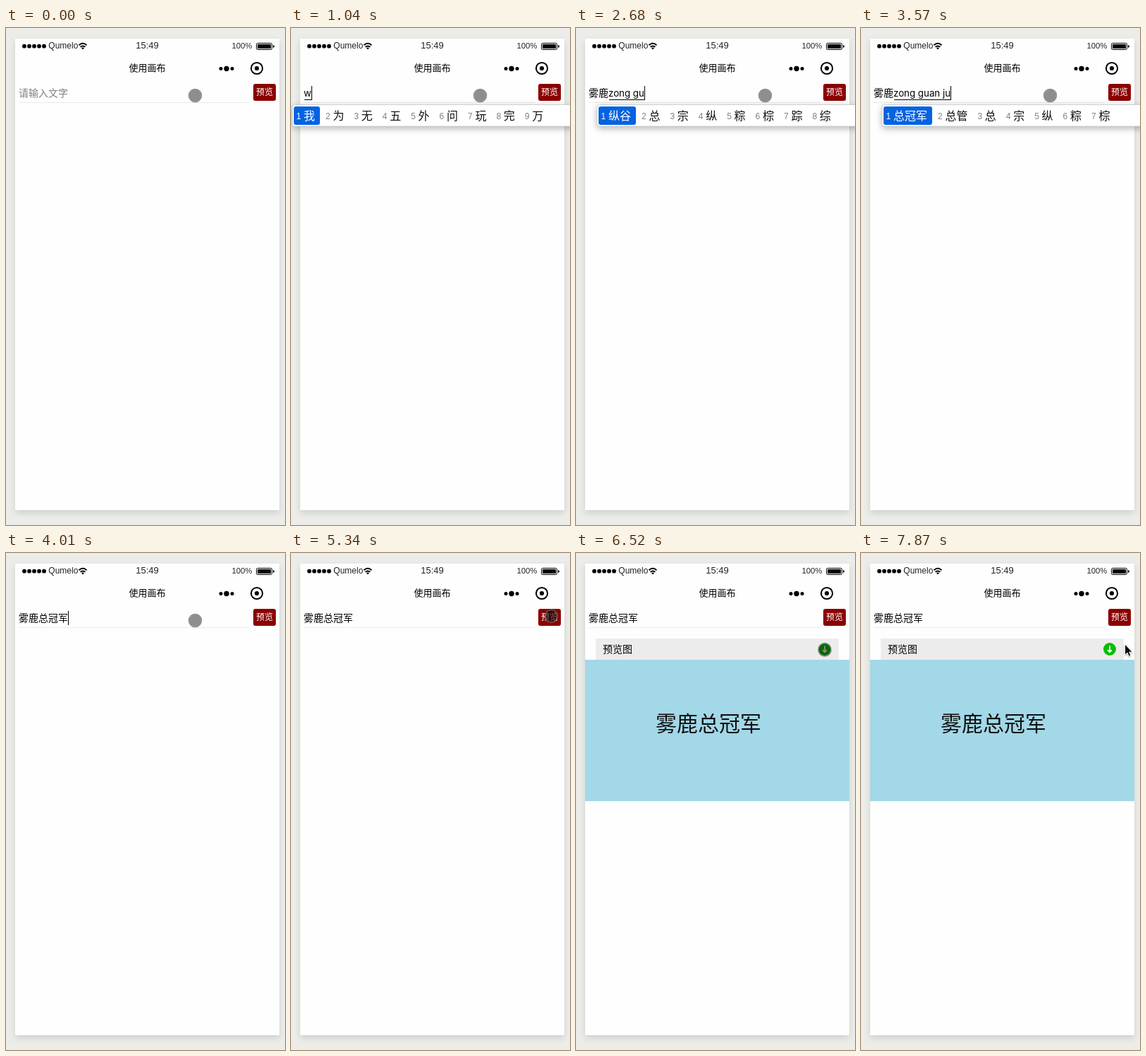
These frames come from a looping animation (396x703 px, 8 s). An HTML page:

```html
<!DOCTYPE html>
<html lang="zh-CN">
<head>
<meta charset="utf-8">
<title>使用画布</title>
<style>
  html, body { margin: 0; width: 100%; height: 100%; overflow: hidden; background: #ecede8; }
  svg { display: block; width: 396px; height: 703px; }
  text { font-family: "Noto Sans CJK SC", "Noto Sans CJK", "Noto Sans", sans-serif; white-space: pre; }
  .latin { font-family: "Liberation Sans", sans-serif; }
  .compose { font: 13.3px Inter, sans-serif; }
  .mid { text-anchor: middle; }
  .panel { filter: drop-shadow(0 3px 5px rgba(0, 0, 0, .28)); }
  .phone { filter: drop-shadow(0 4px 5px rgba(0, 0, 0, .12)); }
  .arrow { filter: drop-shadow(0 1px 1px rgba(0, 0, 0, .35)); }
</style>
</head>
<body>
<svg viewBox="0 0 396 703">
  <rect width="396" height="703" fill="#ecede8"/>
  <rect class="phone" x="13" y="15" width="375" height="667" fill="#fefefe"/>

  <g id="dots"></g>
  <text class="latin" x="60.3" y="29.3" font-size="12" fill="#222">Qumelo</text>
  <g fill="none" stroke="#000" stroke-width="1.9">
    <path d="M103.5 24.2Q109 19.4 114.5 24.2"/>
    <path d="M105.6 26.8Q109 24 112.4 26.8"/>
  </g>
  <path d="M107 28.3Q109 26.7 111 28.3L109 30.4Z"/>
  <text class="latin mid" x="200.5" y="29.4" font-size="13" fill="#222">15:49</text>
  <text class="latin" x="320.5" y="29.2" font-size="11.3" fill="#222">100%</text>
  <rect x="355.5" y="21.5" width="22" height="9" rx="1.8" fill="none" stroke="#000"/>
  <rect x="357" y="23" width="19" height="6" rx=".6"/>
  <path d="M379 24q2 .4 2 2t-2 2z"/>

  <text class="mid" x="200.5" y="61" font-size="13">使用画布</text>
  <circle cx="305" cy="57.5" r="2.5"/><circle cx="313" cy="57.5" r="3.7"/><circle cx="321" cy="57.5" r="2.5"/>
  <circle cx="356" cy="57" r="8.1" fill="none" stroke="#000" stroke-width="2"/>
  <circle cx="356" cy="57" r="3.1"/>

  <rect x="18" y="105" width="328" height="1" fill="#eaeaea"/>
  <text id="hint" x="18" y="97.2" font-size="14" fill="#808080">请输入文字</text>
  <text id="typed" x="18" y="97.2" font-size="14"></text>
  <text id="compose" class="compose" y="97"></text>
  <rect id="underline" y="101" height="1"/>
  <rect id="caret" y="82" width="1" height="20"/>
  <rect x="351" y="79" width="32" height="24" rx="3" fill="#8b0000"/>
  <text class="mid" x="367" y="95.4" font-size="12" fill="#fff">预览</text>

  <g id="preview">
    <rect x="28" y="121" width="345" height="30" fill="#ececec"/>
    <text x="38" y="141.2" font-size="14">预览图</text>
    <circle cx="353" cy="136" r="9" fill="#04be02"/>
    <path d="M353 131.2V140M350 137.2L353 140.3L356 137.2" fill="none" stroke="#fff" stroke-width="1.7"/>
    <rect x="13" y="151" width="375" height="200" fill="#a3d8e8"/>
    <text id="drawn" x="113" y="251.5" font-size="30" fill="#111"></text>
  </g>

  <g id="panel">
    <rect class="panel" y="108.5" width="440" height="30.5" rx="3.5" fill="#fff" stroke="#c8c8c8" stroke-width=".8"/>
    <g id="choices"></g>
  </g>

  <g id="touch">
    <circle id="touchFill" r="8.2"/>
    <circle r="8.9" fill="none" stroke="#6a6a6a" stroke-opacity=".75" stroke-width="1.7"/>
  </g>
  <path id="arrow" class="arrow" d="M0 0V15.2L3.4 12L5.7 17.2L8.3 16.1L6 11.1H10.6Z" stroke="#fff" stroke-width="1"/>
</svg>
<script>
const LOOP = 8000;
const TEAM = "雾鹿", PHRASE = TEAM + "总冠军";
const $ = id => document.getElementById(id);

// time, committed text, pinyin, candidates, panel opacity
const typing = [
  [0, "", "", ""],
  [1040, "", "w", "我 为 无 五 外 问 玩 完 万"],
  [1190, "", "wu l", "无论 无 五 物 务 屋 武 误"],
  [1340, "", "wu lu", TEAM + " 无 五 物 务 屋 武 误"],
  [1480, TEAM, "", ""],
  [1930, TEAM, "z", "在 这 中 找 做 真 最 再 着"],
  [2080, TEAM, "zo", "走 做 总 坐 左 作 昨 座 组"],
  [2380, TEAM, "zong", "总 宗 纵 粽 棕 踪 综 鬃 枞"],
  [2530, TEAM, "zong g", "总共 总 宗 纵 粽 棕 踪 综"],
  [2680, TEAM, "zong gu", "纵谷 总 宗 纵 粽 棕 踪 综"],
  [3120, TEAM, "zong gua", "总挂 总 宗 纵 粽 棕 踪 综"],
  [3270, TEAM, "zong guan", "总管 总 宗 纵 粽 棕 踪 综"],
  [3420, TEAM, "zong guan j", "总冠军 总管 总 宗 纵 粽 棕"],
  [3570, TEAM, "zong guan ju", "总冠军 总管 总 宗 纵 粽 棕"],
  [3720, TEAM, "zong guan jun", "总冠军 总管 总 宗 纵 粽 棕"],
  [3860, PHRASE, "", "总冠军 总管 总 宗 纵 粽 棕", .4],
  [4010, PHRASE, "", ""]
];
const caretAlpha = [[0, 0], [150, .5], [300, 1], [600, .5], [740, 0], [1040, 1], [4450, 0], [4890, 1], [5340, 0]];
const touchPath = [
  [0, 268.5, 95.5], [4450, 300, 92], [4600, 345, 78], [4750, 386, 72], [4890, 377, 82], [5040, 369.3, 89.3],
  [5930, 370, 94], [6080, 371, 106], [6220, 366, 121], [6370, 357, 133], [6520, 353, 137]
];
const arrowPath = [[7570, 351, 136.5], [7870, 374.6, 129]];

const at = (track, t) => track.findLast(step => step[0] <= t);
const show = (el, on) => el.setAttribute("visibility", on ? "visible" : "hidden");
const move = (el, [, x, y]) => el.setAttribute("transform", `translate(${x} ${y})`);

function choicesMarkup(list, left) {
  let x = left + 3.5;
  return list.split(" ").map((word, i) => {
    const first = i === 0, width = 16 * word.length;
    const back = first ? `<rect x="${left}" y="111" width="${21 + width}" height="26" rx="3" fill="#0463e1"/>` : "";
    const item = back +
      `<text class="latin" x="${x}" y="128.5" font-size="12" fill="${first ? "#fff" : "#808080"}">${i + 1}</text>` +
      `<text x="${x + 10.4}" y="129.6" font-size="16" fill="${first ? "#fff" : "#111"}">${word}</text>`;
    x += width + (first ? 25.5 : 24.4);
    return item;
  }).join("");
}

let current;
function renderTyping(state) {
  if (state === current) return;
  current = state;
  const [, text, pinyin, list, alpha = 1] = state;
  const start = 18 + 14 * text.length;
  const anchor = pinyin ? start : 18 + 14 * TEAM.length;
  show($("hint"), !text && !pinyin);
  $("typed").textContent = text;
  $("compose").textContent = pinyin;
  $("compose").setAttribute("x", start);
  const width = pinyin ? $("compose").getComputedTextLength() : 0;
  $("underline").setAttribute("x", start + 1);
  $("underline").setAttribute("width", Math.max(0, width - 1));
  $("caret").setAttribute("x", Math.round(start + width));
  show($("panel"), list);
  $("panel").setAttribute("opacity", alpha);
  $("panel").firstElementChild.setAttribute("x", anchor - 16);
  $("choices").innerHTML = list ? choicesMarkup(list, anchor - 14) : "";
}

function render(t) {
  renderTyping(at(typing, t));
  $("caret").setAttribute("opacity", at(caretAlpha, t)[1]);
  show($("preview"), t >= 5490);

  const pressed = t >= 5340 && t < 5490;
  move($("touch"), at(touchPath, t));
  $("touchFill").setAttribute("fill-opacity", pressed ? .58 : .44);
  const arrow = at(arrowPath, t);
  show($("touch"), !arrow);
  show($("arrow"), arrow);
  if (arrow) move($("arrow"), arrow);
}

$("dots").innerHTML = [0, 1, 2, 3, 4].map(i => `<circle cx="${26 + 7 * i}" cy="25.7" r="2.9"/>`).join("");
$("drawn").textContent = PHRASE;

const began = performance.now();
function tick() {
  render((performance.now() - began) % LOOP);
  requestAnimationFrame(tick);
}
tick();
</script>
</body>
</html>
```
